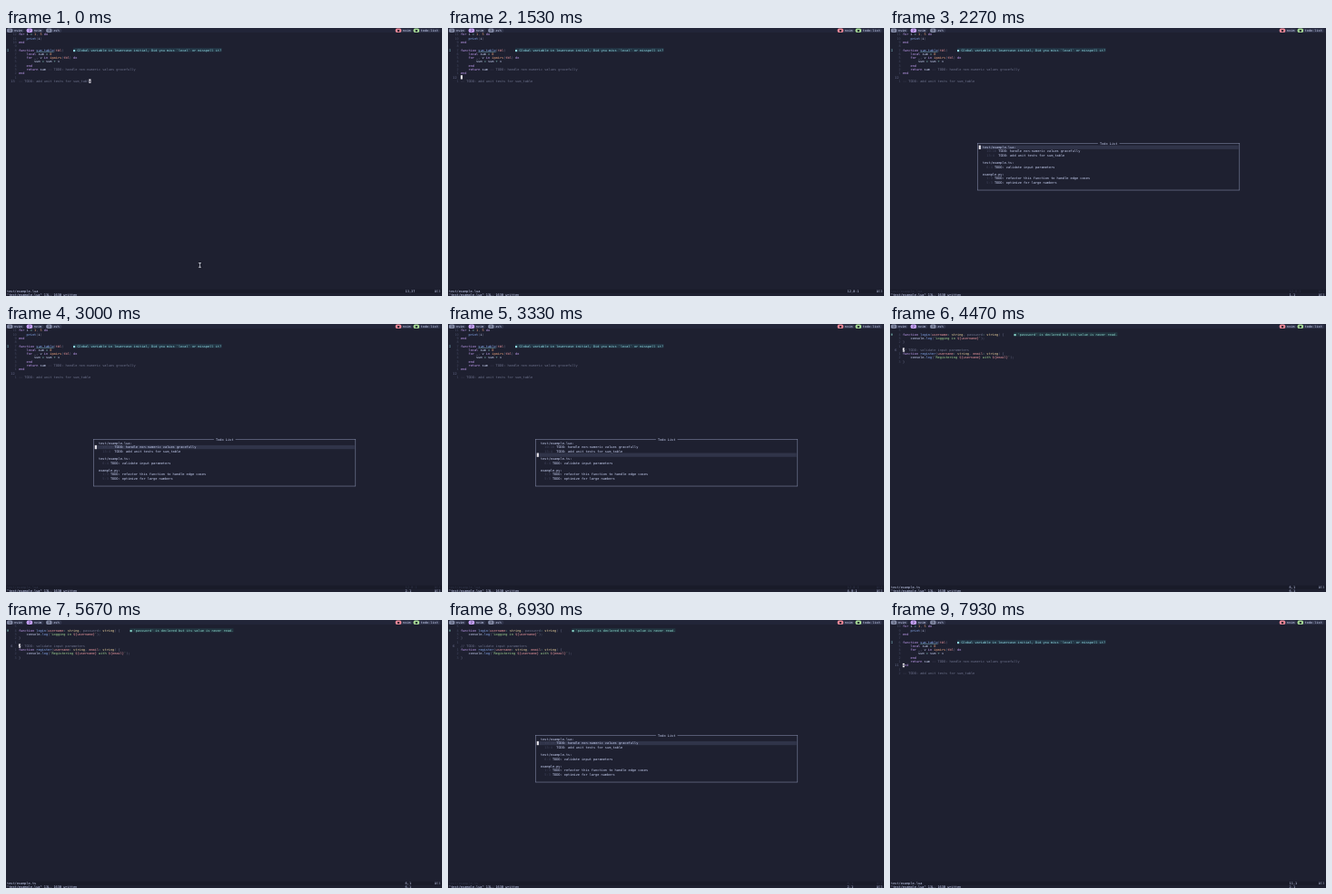
Animation, 480 px wide and 296 px high, one loop 8000 ms. Source, as an HTML page:

```html
<!DOCTYPE html>
<html lang="en">
<head>
<meta charset="utf-8">
<title>Todo list in the editor</title>
<style>
  html, body { margin: 0; width: 100%; height: 100%; overflow: hidden; background: #1e2030; }
  svg { display: block; width: 100vw; height: 100vh; }
  text {
    font: 3.571px "DejaVu Sans Mono", "Noto Sans Mono", monospace;
    white-space: pre;
    text-rendering: geometricPrecision;
  }
</style>
</head>
<body>
<svg viewBox="0 0 480 296" preserveAspectRatio="none">
  <g id="tabs"></g>
  <g id="screen"></g>
  <g id="mouse" fill="none" stroke-linecap="round">
    <path d="M212.2 259.6h2.4M213.4 259.6v4.6M212.2 264.2h2.4" stroke="#11131d" stroke-width="1.9"/>
    <path d="M212.2 259.6h2.4M213.4 259.6v4.6M212.2 264.2h2.4" stroke="#d5d8e6" stroke-width=".8"/>
  </g>
</svg>
<script>
const LOOP = 8000;
const CW = 2.15, LH = 4.3, LEFT = 1, TOP = 0.6;
const CODE = 6, POP = 45, POP_ROW = 30;
const STATUS = 67, CMD = 68, RULER = 204;

const color = {
  bg: '#1e2030', bar: '#191b29', t: '#cad3f5', k: '#c6a0f6', f: '#8aadf4',
  s: '#a6da95', n: '#f5a97f', c: '#6e738d', p: '#ee99a0', y: '#eed49f',
  o: '#8bd5ca', i: '#91d7e3', num: '#454962', cur: '#6b7090', dim: '#30344a',
  pos: '#40445c', caret: '#e6e3ea', line: '#303449', edge: '#7d83a0'
};

// Each line alternates colour key and text.
const files = {
  lua: {
    name: 'test/example.lua',
    hint: { line: 5, sign: 'I', key: 'i', bg: '#233645',
      text: 'Global variable in lowercase initial, Did you miss `local` or misspell it?' },
    lines: [
      ['k', 'for ', 't', 'i ', 'o', '= ', 'n', '1', 'c', ', ', 'n', '5 ', 'k', 'do'],
      ['f', '    print', 'c', '(', 't', 'i', 'c', ')'],
      ['k', 'end'],
      [],
      ['k', 'function ', 'f', 'sum_table', 'c', '(', 'p', 'tbl', 'c', ')'],
      ['k', '    local ', 't', 'sum ', 'o', '= ', 'n', '0'],
      ['k', '    for ', 't', '_', 'c', ', ', 't', 'v ', 'k', 'in ', 'n', 'ipairs', 'c', '(', 'p', 'tbl', 'c', ') ', 'k', 'do'],
      ['t', '        sum ', 'o', '= ', 't', 'sum ', 'o', '+ ', 't', 'v'],
      ['k', '    end'],
      ['k', '    return ', 't', 'sum ', 'c', '-- TODO: handle non-numeric values gracefully'],
      ['k', 'end'],
      [],
      ['c', '-- TODO: add unit tests for sum_table']
    ]
  },
  ts: {
    name: 'test/example.ts',
    hint: { line: 2, sign: 'H', key: 'o', bg: '#223540',
      text: "'password' is declared but its value is never read." },
    lines: [
      [],
      ['k', 'function ', 'f', 'login', 'c', '(', 'p', 'username', 'o', ': ', 'y', 'string', 'c', ', password', 'o', ': ', 'y', 'string', 'c', ') {'],
      ['t', '    console', 'o', '.', 'f', 'log', 'c', '(', 's', '`Logging in ', 'p', '${username}', 's', '`', 'c', ');'],
      ['c', '}'],
      [],
      ['c', '// TODO: validate input parameters'],
      ['k', 'function ', 'f', 'register', 'c', '(', 'p', 'username', 'o', ': ', 'y', 'string', 'c', ', ', 'p', 'email', 'o', ': ', 'y', 'string', 'c', ') {'],
      ['t', '    console', 'o', '.', 'f', 'log', 'c', '(', 's', '`Registering ', 'p', '${username}', 's', ' with ', 'p', '${email}', 's', '`', 'c', ');'],
      ['c', '}']
    ]
  }
};

const todos = [
  ['t', '  test/example.lua:'],
  ['pos', '    10:16 ', 't', 'TODO: handle non-numeric values gracefully'],
  ['pos', '    13:4  ', 't', 'TODO: add unit tests for sum_table'],
  [],
  ['t', '  test/example.ts:'],
  ['pos', '    6:4 ', 't', 'TODO: validate input parameters'],
  [],
  ['t', '  example.py:'],
  ['pos', '    1:3 ', 't', 'TODO: refactor this function to handle edge cases'],
  ['pos', '    5:3 ', 't', 'TODO: optimize for large numbers']
];

// time, file, line, column, selected popup line (0 = closed), left-over ruler
const steps = [
  [0, 'lua', 13, 37, 0, ''],
  [1070, 'lua', 12, 1, 0, ''],
  [1930, 'lua', 12, 1, 1, ''],
  [3000, 'lua', 12, 1, 2, ''],
  [3200, 'lua', 12, 1, 3, ''],
  [3330, 'lua', 12, 1, 4, ''],
  [3670, 'lua', 12, 1, 5, ''],
  [4000, 'lua', 12, 1, 6, ''],
  [4470, 'ts', 6, 1, 0, '6,1'],
  [6200, 'ts', 6, 1, 1, ''],
  [6800, 'ts', 6, 1, 2, ''],
  [7270, 'lua', 10, 1, 0, '2,1'],
  [7930, 'lua', 11, 1, 0, '2,1']
];

const px = col => LEFT + col * CW;
const py = row => TOP + row * LH;
const rect = (x, y, w, h, fill, extra = '') =>
  `<rect x="${x}" y="${y}" width="${w}" height="${h}" fill="${fill}" ${extra}/>`;
const cells = (col, row, n, fill) => rect(px(col), py(row), n * CW, LH, fill);
const put = (col, row, str, key) =>
  `<text x="${px(col)}" y="${py(row) + 3.4}" fill="${color[key]}">${str}</text>`;
const plain = line => line.filter((_, i) => i % 2).join('');
const ruler = (line, col, text) => `${line},${text ? col : '0-1'}`;

function spans(col, row, line) {
  let out = '';
  for (let i = 0; i < line.length; i += 2) {
    const str = line[i + 1], body = str.trimStart();
    out += put(col + str.length - body.length, row, body, line[i]);
    col += str.length;
  }
  return out;
}

function caret(col, row, char = '') {
  return cells(col, row, 1, color.caret) + put(col, row, char.trim(), 'bg');
}

function editor(file, cur, col, open) {
  const { lines, hint } = file;
  let out = '';
  lines.forEach((line, i) => {
    const n = i + 1;
    out += n === cur
      ? put(2, n, String(n), 'cur')
      : put(2, n, String(Math.abs(n - cur)).padStart(3), 'num');
    out += spans(CODE, n, line);
  });
  const end = CODE + plain(lines[hint.line - 1]).length + 5;
  out += put(0, hint.line, hint.sign, hint.key);
  out += cells(end, hint.line, hint.text.length + 2, hint.bg);
  out += put(end, hint.line, '■ ' + hint.text, hint.key);
  if (file === files.lua)
    out += rect(px(CODE + 9), py(5) + 3.9, 9 * CW, 0.35, color.i);
  if (!open) out += caret(CODE + col - 1, cur, plain(lines[cur - 1])[col - 1]);
  return out;
}

function popup(sel) {
  const x = px(POP - 0.5), y = py(POP_ROW - 0.5), w = 134 * CW, h = 12 * LH;
  const row = POP_ROW + sel - 1, text = plain(todos[sel - 1]);
  return rect(x, y, w, h, color.bg, `stroke="${color.edge}" stroke-width=".6"`)
    + cells(106, POP_ROW - 1, 11, color.bg)
    + put(107, POP_ROW - 1, 'Todo List', 't')
    + cells(POP, row, 133, color.line)
    + todos.map((line, i) => spans(POP, POP_ROW + i, line)).join('')
    + caret(POP, row)
    + put(RULER, CMD, ruler(sel, 1, text), 't') + put(219, CMD, 'All', 't');
}

function screen([, id, line, col, sel, left]) {
  const file = files[id], key = sel ? 'dim' : 't';
  return editor(file, line, col, sel)
    + rect(0, py(STATUS), 480, LH, color.bar)
    + put(0, STATUS, file.name, key)
    + put(RULER, STATUS, ruler(line, col, plain(file.lines[line - 1])), key)
    + put(219, STATUS, 'All', key)
    + put(0, CMD, '"test/example.lua" 13L, 163B written', 't')
    + put(RULER, CMD, left, 't')
    + (sel ? popup(sel) : '');
}

function tab(x, w, fill, mark, name) {
  return rect(x, 0.6, w, LH, '#30344a', 'rx="1.6"')
    + rect(x, 0.6, 6.4, LH, fill, 'rx="1.6"')
    + `<text x="${x + 2.1}" y="4" fill="${color.bg}">${mark}</text>`
    + `<text x="${x + 8}" y="4" fill="${color.t}">${name}</text>`;
}

const $ = id => document.getElementById(id);
$('tabs').innerHTML = rect(0, 0, 480, 5, '#222538')
  + tab(1, 18.6, '#8087a2', 1, 'nvim')
  + tab(22.7, 18.6, '#c6a0f6', 2, 'nvim')
  + tab(44.2, 17, '#8087a2', 3, 'zsh')
  + tab(428.8, 18.4, '#ed8796', '■', 'nvim')
  + tab(448.6, 29, '#a6da95', '■', 'todo-list');

let shown = -1;
function frame() {
  const t = performance.now() % LOOP;
  const now = steps.findLastIndex(s => s[0] <= t);
  if (now !== shown) $('screen').innerHTML = screen(steps[shown = now]);
  $('mouse').setAttribute('opacity', Math.min(1, Math.max(0, (270 - t) / 200)));
  requestAnimationFrame(frame);
}
frame();
</script>
</body>
</html>
```
